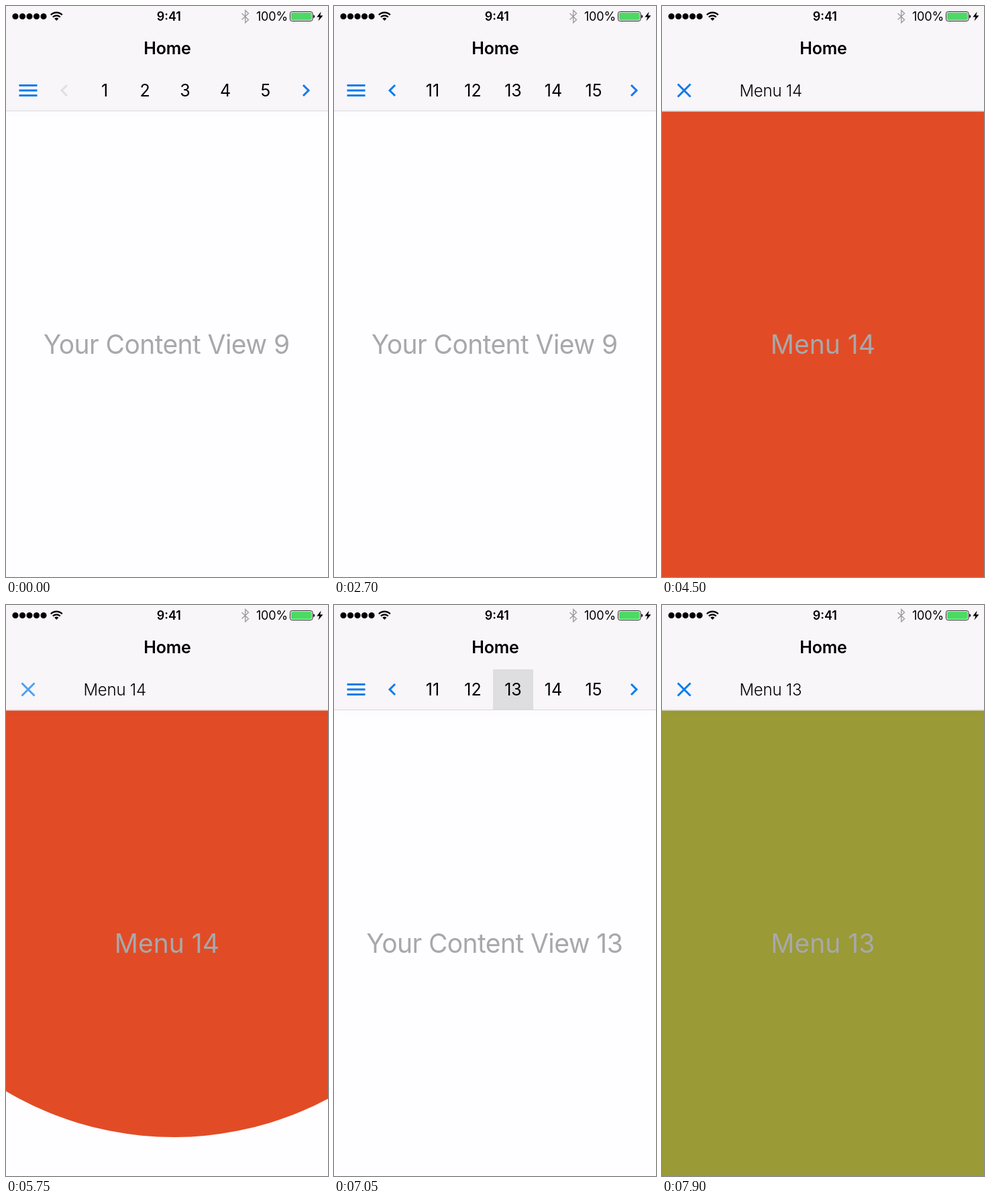
These frames come from a looping animation (480 by 852 pixels, 8 s). An HTML page:

```html
<!DOCTYPE html>
<html lang="en">
<head>
<meta charset="utf-8">
<title>Paged menu</title>
<style>
html, body { margin: 0; width: 100%; height: 100%; overflow: hidden; background: #fefdff; }
.stage { position: relative; width: 480px; height: 852px; overflow: hidden; }
.stage > svg, .menu { position: absolute; left: 0; top: 0; width: 480px; height: 852px; }
.bar { fill: #f8f6f9; }
svg { display: block; font-family: Inter, "Liberation Sans", sans-serif; font-optical-sizing: none; }
.big { font-size: 39px; letter-spacing: -.015em; fill: #a8a8ab; text-anchor: middle; }
.menu .big { letter-spacing: 0; }
.num { font-size: 25px; text-anchor: middle; }
.label { font-size: 24px; font-weight: 300; letter-spacing: -.01em; }
.icon { fill: none; stroke: #087bef; stroke-width: 3; }
.cell { fill: #dedde0; }
.divider { position: absolute; left: 0; top: 156px; width: 480px; height: 1px; background: #dad9dc; box-shadow: 0 2px 10px rgba(0, 0, 0, .11); }

/* One 8 s clock: 1% is 80 ms */
.strip, .sel9, .sel14, .sel13, .prev, .next, .burger, .close, .menu { animation: 8s linear infinite; }
.strip { animation-name: strip; }
.sel9 { animation-name: sel9; animation-timing-function: step-end; }
.sel14 { animation-name: sel14; animation-timing-function: step-end; }
.sel13 { animation-name: sel13; animation-timing-function: step-end; }
.prev { animation-name: prev; animation-timing-function: step-end; }
.next { animation-name: next; }
.burger { animation-name: burger; }
.close { animation-name: close; }
.orange { animation-name: orange; }
.olive { animation-name: olive; }

@keyframes strip {
  0% { transform: translateX(0); }
  12.9% { transform: translateX(0); animation-timing-function: ease-in-out; }
  16.65% { transform: translateX(-300px); }
  22.1875% { transform: translateX(-300px); animation-timing-function: ease-in-out; }
  26.375%, 100% { transform: translateX(-600px); }
}
@keyframes sel9 { 0% { visibility: visible; } 36.875%, 100% { visibility: hidden; } }
@keyframes sel14 { 0% { visibility: hidden; } 36.875% { visibility: visible; } 84.375%, 100% { visibility: hidden; } }
@keyframes sel13 { 0% { visibility: hidden; } 84.375%, 100% { visibility: visible; } }
@keyframes prev { 0% { stroke: #e0dfe3; } 12.875%, 100% { stroke: #087bef; } }
@keyframes next {
  0%, 11.8% { opacity: 1; }
  12.1%, 12.7% { opacity: .2; }
  16.5%, 20.9% { opacity: 1; }
  21.2%, 22.1% { opacity: .2; }
  26.6%, 100% { opacity: 1; }
}
@keyframes burger {
  0%, 52.4% { opacity: 1; }
  52.6%, 53% { opacity: .3; }
  56%, 94.3% { opacity: 1; }
  94.5%, 95% { opacity: .3; }
  98%, 100% { opacity: 1; }
}
@keyframes close {
  0%, 66.6% { opacity: 1; }
  69%, 70% { opacity: .2; }
  73%, 100% { opacity: 1; }
}
/* The circle grows with its left and top edges held in place */
@keyframes orange {
  0%, 52.619% { clip-path: circle(0px at -240px -186px); }
  56.369%, 71.2% { clip-path: circle(600px at 360px 414px); }
  74.95%, 100% { clip-path: circle(0px at -240px -186px); }
}
@keyframes olive {
  0%, 94.875% { clip-path: circle(0px at -240px -186px); }
  98.625%, 100% { clip-path: circle(600px at 360px 414px); }
}
</style>
</head>
<body>
<div class="stage">
  <svg viewBox="0 0 480 852">
    <rect width="480" height="852" fill="#fefdff"/>
    <rect class="bar" width="480" height="157"/>
    <text class="big sel9" x="239.2" y="519">Your Content View 9</text>
    <text class="big sel14" x="239.2" y="519">Your Content View 14</text>
    <text class="big sel13" x="239.2" y="519">Your Content View 13</text>
    <path class="icon burger" d="M19.5 118.5h27M19.5 126h27M19.5 133.5h27"/>
    <path class="icon prev" d="M91 118l-8 8 8 8"/>
    <path class="icon next" d="M443 118l8 8-8 8"/>
    <svg x="117" y="96" width="300" height="60" overflow="hidden">
      <g class="strip" id="strip"></g>
    </svg>
  </svg>

  <div class="menu orange">
    <svg viewBox="0 0 480 852">
      <rect width="480" height="852" fill="#e14c26"/>
      <rect class="bar" width="480" height="157.5"/>
      <path class="icon close" d="M23.5 116.5l19 19m0-19l-19 19"/>
      <text class="label" x="115.5" y="135">Menu 14</text>
      <text class="big" x="239.8" y="519">Menu 14</text>
    </svg>
  </div>
  <div class="menu olive">
    <svg viewBox="0 0 480 852">
      <rect width="480" height="852" fill="#9a9a36"/>
      <rect class="bar" width="480" height="157.5"/>
      <path class="icon" d="M23.5 116.5l19 19m0-19l-19 19"/>
      <text class="label" x="115.5" y="135">Menu 13</text>
      <text class="big" x="239.8" y="519">Menu 13</text>
    </svg>
  </div>

  <div class="divider"></div>

  <svg viewBox="0 0 480 852">
    <rect class="bar" width="480" height="96"/>
    <path d="M14 15.5h42.1" fill="none" stroke="#000" stroke-width="9.2" stroke-linecap="round" stroke-dasharray="0 10.5"/>
    <path d="M66.8 13.3a12 12 0 0 1 17 0M69.8 16.5a7.8 7.8 0 0 1 11 0" fill="none" stroke="#000" stroke-width="2.3"/>
    <path d="M75.3 22l-3.1-3.3a4.4 4.4 0 0 1 6.2 0z"/>
    <text x="242.8" y="22" font-size="18" font-weight="600" text-anchor="middle">9:41</text>
    <path d="M351.5 11l10 9.5-4.8 4.5V6.5l4.8 4.5-10 9.5" fill="none" stroke="#9d9ca0" stroke-width="1.4"/>
    <text x="373" y="22" font-size="18" letter-spacing="-.2">100%</text>
    <rect x="423.5" y="8.5" width="33.5" height="14" rx="2.8" fill="none" stroke="#222"/>
    <rect x="425" y="10" width="30.5" height="11" rx="1.4" fill="#4cd964"/>
    <path d="M458.2 13v5.2q2-.6 2-2.6t-2-2.6z"/>
    <path d="M469.6 8.5l-6.3 8h4l-1.8 6 7-8.3h-4.2z"/>
    <text x="240.5" y="72" font-size="25" font-weight="600" letter-spacing="-.2" text-anchor="middle">Home</text>
  </svg>
</div>
<script>
const cell = n => `<rect class="cell sel${n}" x="${60 * (n - 1)}" width="60" height="60"/>`;
const number = (_, i) => `<text class="num" x="${60 * i + 30}" y="39">${i + 1}</text>`;
document.getElementById('strip').innerHTML =
  [9, 14, 13].map(cell).join('') + Array.from({ length: 15 }, number).join('');
</script>
</body>
</html>
```
